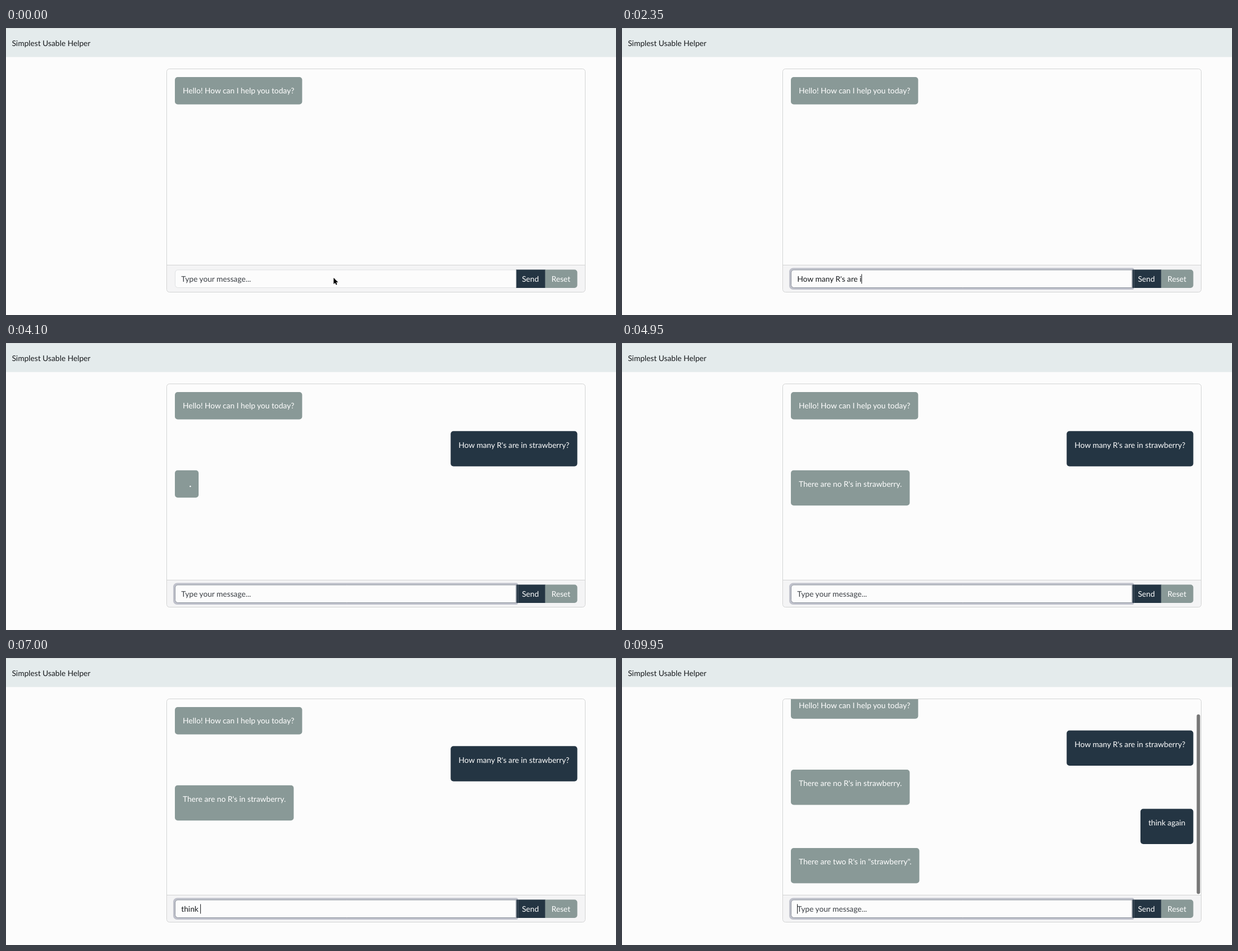
An HTML page with a canvas that plays this animation: 1080 px wide and 509 px high, repeating every 10000 ms.

```html
<!DOCTYPE html>
<html lang="en">
<head>
<meta charset="utf-8">
<title>Chat</title>
<style>
  html, body { margin: 0; width: 100%; height: 100%; overflow: hidden; background: #fcfcfc; }
  canvas { display: block; width: 1080px; height: 509px; }
</style>
</head>
<body>
<canvas id="stage"></canvas>
<script>
const W = 1080, H = 509, LOOP = 10000;
const PAGE = '#fcfcfc', DARK = '#243543', GRAY = '#899997', LIGHT = '#ffffff';
const LINE = '#d3d4d4', INK = '#16191c';
const LEFT = 299, RIGHT = 1011.5, PAD = 14;

// Moments of the conversation, in ms
const FOCUS = 900;
const turns = [
  { text: "How many R's are in strawberry?", type: 1520, pace: 47, send: 3110,
    reply: "There are no R's in strawberry.", answer: 4150 },
  { text: 'think again', type: 6600, pace: 75, send: 7660,
    reply: 'There are two R\'s in "strawberry".', answer: 9100 }
];

const canvas = document.getElementById('stage');
const ctx = canvas.getContext('2d');
const dpr = window.devicePixelRatio || 1;
canvas.width = Math.round(W * dpr);
canvas.height = Math.round(H * dpr);

const clamp = (v, lo, hi) => Math.max(lo, Math.min(hi, v));

function box(x, y, w, h, r, fill, stroke) {
  ctx.beginPath();
  ctx.roundRect(x, y, w, h, r);
  if (fill) { ctx.fillStyle = fill; ctx.fill(); }
  if (stroke) { ctx.strokeStyle = stroke; ctx.stroke(); }
}

function label(text, x, y, color) {
  ctx.fillStyle = color;
  ctx.fillText(text, x, y);
}

function dots(y, age) {
  const phase = age / 1000;
  for (let i = 0; i < 3; i++) {
    const glow = Math.cos(2 * Math.PI * (phase + (2 - i) / 3));
    ctx.globalAlpha = clamp(0.2 + 0.8 * glow, 0, 1);
    ctx.fillStyle = LIGHT;
    ctx.beginPath();
    ctx.arc(314.3 + i * 6, y, 1.2, 0, 2 * Math.PI);
    ctx.fill();
  }
  ctx.globalAlpha = 1;
}

// Messages present at time t, stacked from the top
function messages(t) {
  const list = [{ text: 'Hello! How can I help you today?', y: 87, h: 48.5 }];
  let y = 156.3;
  for (const turn of turns) {
    if (t < turn.send) break;
    list.push({ text: turn.text, y, h: 62.5, mine: true });
    y += 69.5;
    if (t < turn.answer) {
      list.push({ y, h: 48.5, age: t - turn.send });
    } else {
      const count = 1 + Math.floor((t - turn.answer) / 50);
      list.push({ text: turn.reply.split(' ').slice(0, count).join(' '), y, h: 62.5 });
    }
    y += 69.5;
  }
  return list;
}

function bubble(m, scroll) {
  const y = m.y - scroll;
  const w = m.text ? ctx.measureText(m.text).width + 2 * PAD : 42;
  const x = m.mine ? RIGHT - w : LEFT;
  box(x, y, w, m.h, 5, m.mine ? DARK : GRAY);
  if (m.text) label(m.text, x + PAD, y + 29.3, LIGHT);
  else dots(y + 28.5, m.age);
}

function chat(t) {
  const list = messages(t);
  const last = list[list.length - 1];
  const scroll = Math.max(0, last.y + last.h + 21 - 420.5);

  box(284.5, 72.5, 741, 396, 5, PAGE);
  ctx.save();
  ctx.beginPath();
  ctx.rect(285, 73, 740, 347.5);
  ctx.clip();
  list.forEach(m => bubble(m, scroll));
  if (scroll > 0) {
    const thumb = 345 * 347.5 / (347.5 + scroll) - 1;
    box(1017.5, 418.5 - thumb, 6, thumb, 3, '#777777');
  }
  ctx.restore();

  box(285, 420.5, 740, 48, [0, 0, 5, 5], '#f4f4f5');
  ctx.fillStyle = LINE;
  ctx.fillRect(285, 420, 740, 1);
  box(284.5, 72.5, 741, 396, 5, null, LINE);
}

function field(t) {
  const focus = clamp((t - FOCUS) / 150, 0, 1);
  box(903, 428.5, 52, 32.5, 0, DARK);
  box(954.5, 428.5, 57, 32.5, [0, 5, 5, 0], GRAY);
  label('Send', 913.4, 450, LIGHT);
  label('Reset', 965.8, 450, LIGHT);

  if (focus > 0) {
    ctx.globalAlpha = focus;
    box(296, 425.5, 610.5, 38.5, [7, 3, 3, 7], '#bfc1cb');
    box(903.5, 428.5, 3, 32.5, 0, DARK);
    ctx.globalAlpha = 1;
  }
  box(299.5, 429, 603.5, 31.5, [5, 0, 0, 5], PAGE, '#dfe1e3');
  if (focus > 0) {
    ctx.globalAlpha = focus;
    box(299.5, 429, 603.5, 31.5, [5, 0, 0, 5], null, '#8f959f');
    ctx.globalAlpha = 1;
  }

  const turn = turns.find(v => t >= v.type && t < v.send);
  const typed = turn ? turn.text.slice(0, 1 + Math.floor((t - turn.type) / turn.pace)) : '';
  label(typed || 'Type your message...', 310.3, 450, typed ? INK : '#3c4046');

  if (t >= FOCUS) {
    let since = FOCUS;
    for (const v of turns) {
      if (t >= v.type) since = Math.min(t, v.type + v.text.length * v.pace);
      if (t >= v.send) since = v.send;
    }
    if ((t - since) % 1000 < 500) {
      ctx.fillStyle = INK;
      ctx.fillRect(310 + (typed ? ctx.measureText(typed).width : 0), 436.5, 1, 17);
    }
  }
}

function pointer(x, y) {
  ctx.save();
  ctx.translate(x, y);
  ctx.beginPath();
  [[0, 0], [0, 11.2], [2.6, 8.8], [4.3, 12.6], [6.2, 11.8], [4.6, 8.1], [8, 8]]
    .forEach(p => ctx.lineTo(...p));
  ctx.closePath();
  ctx.lineJoin = 'round';
  ctx.lineWidth = 1.6;
  ctx.strokeStyle = '#fff';
  ctx.stroke();
  ctx.fillStyle = '#000';
  ctx.fill();
  ctx.restore();
}

function draw(t) {
  ctx.setTransform(dpr, 0, 0, dpr, 0, 0);
  ctx.font = '13.7px Lato, sans-serif';
  ctx.textRendering = 'geometricPrecision';
  ctx.lineWidth = 1;
  ctx.fillStyle = PAGE;
  ctx.fillRect(0, 0, W, H);
  ctx.fillStyle = '#e4ebec';
  ctx.fillRect(0, 0, W, 51.5);
  ctx.fillStyle = '#d9dcde';
  ctx.fillRect(0, 0, W, 1);
  label('Simplest Usable Helper', 10.5, 32, INK);
  chat(t);
  field(t);
  if (t < turns[0].type) pointer(580, 443);
}

const start = performance.now();
function frame() {
  draw((performance.now() - start) % LOOP);
  requestAnimationFrame(frame);
}
frame();
</script>
</body>
</html>
```
